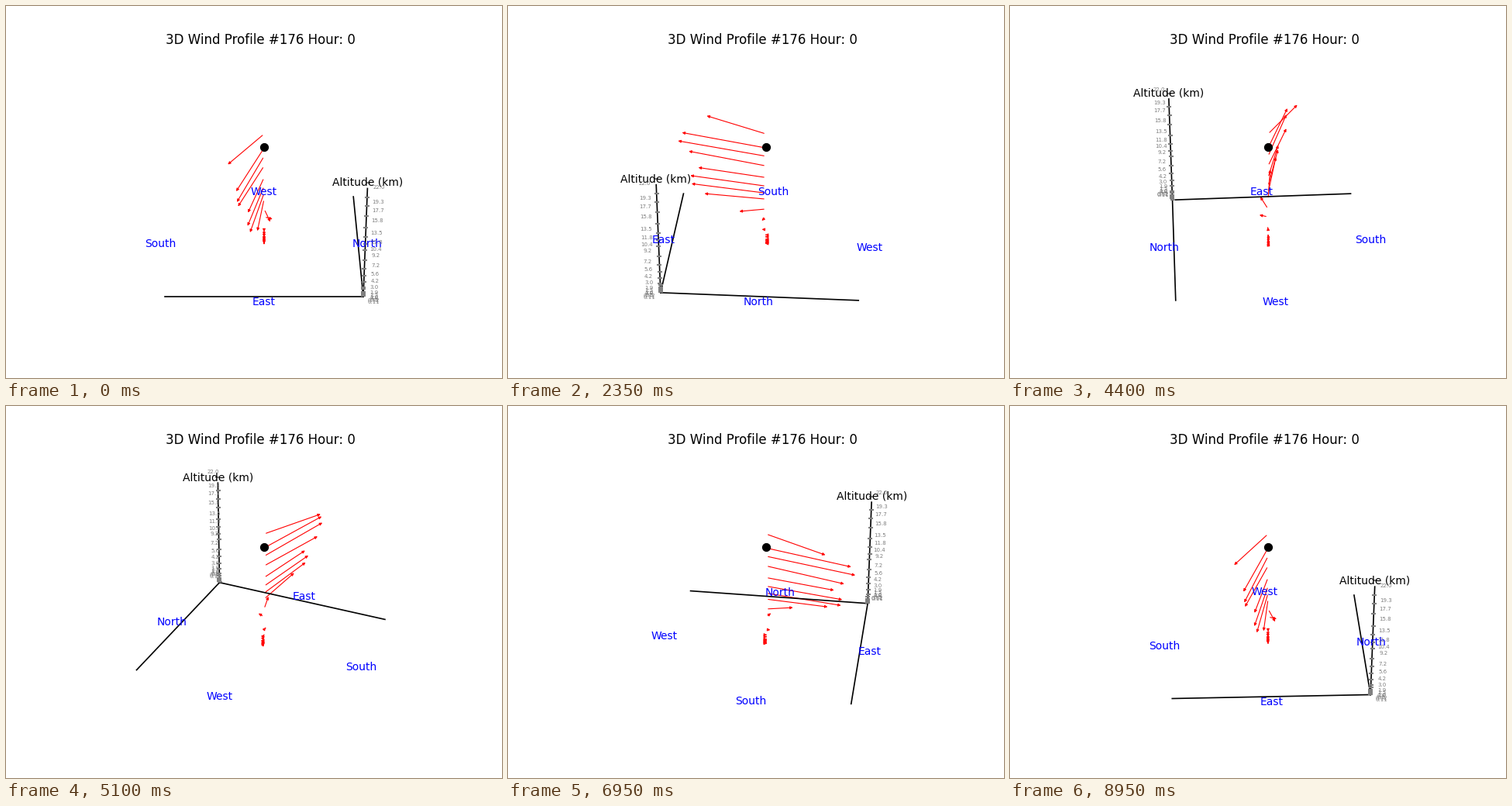
Write a matplotlib script that moves like this. It is 640 px wide and 480 px high and loops after 9 s.

```python
import numpy as np
import matplotlib.pyplot as plt
from matplotlib.animation import FuncAnimation
from matplotlib.patches import FancyArrowPatch

W, H, FRAMES = 640, 480, 180
SCALE, DIST = 1997.84, 10.0          # perspective zoom and camera distance
CX, CY = 333.0, 237.4                # screen centre of the box
SIN_E, COS_E = 0.5, np.sqrt(3) / 2   # camera elevation 30 degrees
EDGE = 0.6196                        # half side of the ground square
RIM = 1.1 * EDGE                     # compass and tick labels

LEVELS = [0.11, 0.32, 0.5, 0.8, 1.0, 1.5, 1.9, 3.0, 4.2, 5.6, 7.2, 9.2,
          10.4, 11.8, 13.5, 15.8, 17.7, 19.3, 22.0]   # km
TOP = LEVELS[-1]


def ease(x, keys, values):
    """Cosine easing from one key point to the next."""
    steps = np.arange(len(keys))
    i, f = np.divmod(np.interp(x, keys, steps), 1)
    return np.interp(i + (1 - np.cos(np.pi * f)) / 2, steps, values)


def wind(alt):
    east = ease(alt, [1.9, 3, 4.2, 4.5, 11.2, 13.5, 18.2, 22.4],
                [0.006, 0.028, 0, 0, 0.527, 0.463, 0.603, 0.41])
    north = ease(alt, [4.2, 5.8, 11.5, 13.3, 16.2, 18.8, 22],
                 [0, 0.071, -0.107, -0.104, -0.169, -0.172, -0.231])
    return east, north


def project(x, y, alt, azim):
    c, s = np.cos(azim), np.sin(azim)
    right, near, z = c * y - s * x, c * x + s * y, 0.0373 * alt - 0.4114
    k = SCALE / (DIST - COS_E * near - SIN_E * z)
    return CX + k * right, CY - k * (COS_E * z - SIN_E * near)


fig = plt.figure(figsize=(W / 100, H / 100), dpi=100)
ax = fig.add_axes([0, 0, 1, 1])
ax.set_xlim(0, W)
ax.set_ylim(H, 0)
ax.axis("off")
ax.text(328, 49.3, "3D Wind Profile #176 Hour: 0", fontsize=12, ha="center")

corner = (EDGE, EDGE, 0)
ends = [(-EDGE, EDGE, 0), (EDGE, -EDGE, 0), (EDGE, EDGE, 0.95 * TOP)]
axes_lines = [ax.plot([], [], "k", lw=1.2)[0] for _ in ends]
ticks, = ax.plot([], [], "_", color="gray", ms=5, mew=1.5)
ax.plot(*project(0, 0, 19.44, 0), "ko", ms=7.07, zorder=5)

labels = []


def add_label(text, pos, **style):
    t = ax.text(0, 0, text, ha="center", va="center", **style)
    labels.append((t, pos))


for i, name in enumerate(["East", "North", "West", "South"]):
    turn = i * np.pi / 2
    add_label(name, (RIM * np.cos(turn), RIM * np.sin(turn), 0), color="blue")
add_label("Altitude (km)", (EDGE, EDGE, TOP), color="black")
for alt in LEVELS:
    add_label(str(alt), (RIM, RIM, alt), color="gray", fontsize=5)

arrows = []
for alt in LEVELS:
    u, v = wind(alt)
    if np.hypot(u, v) > 0.001:
        patch = FancyArrowPatch((0, 0), (1, 1), arrowstyle="-|>",
                                mutation_scale=5, lw=0.8, color="red")
        arrows.append((ax.add_patch(patch), alt, u, v))


def draw(i):
    azim = np.radians(2 * i)
    for line, end in zip(axes_lines, ends):
        line.set_data(*zip(project(*corner, azim), project(*end, azim)))
    ticks.set_data(*zip(*(project(EDGE, EDGE, alt, azim) for alt in LEVELS)))
    for t, pos in labels:
        t.set_position(project(*pos, azim))
    for patch, alt, u, v in arrows:
        patch.set_positions(project(0, 0, alt, azim), project(u, v, alt, azim))
    return []


anim = FuncAnimation(fig, draw, frames=FRAMES, interval=50,
                     repeat=True, repeat_delay=0)
plt.show()
```
